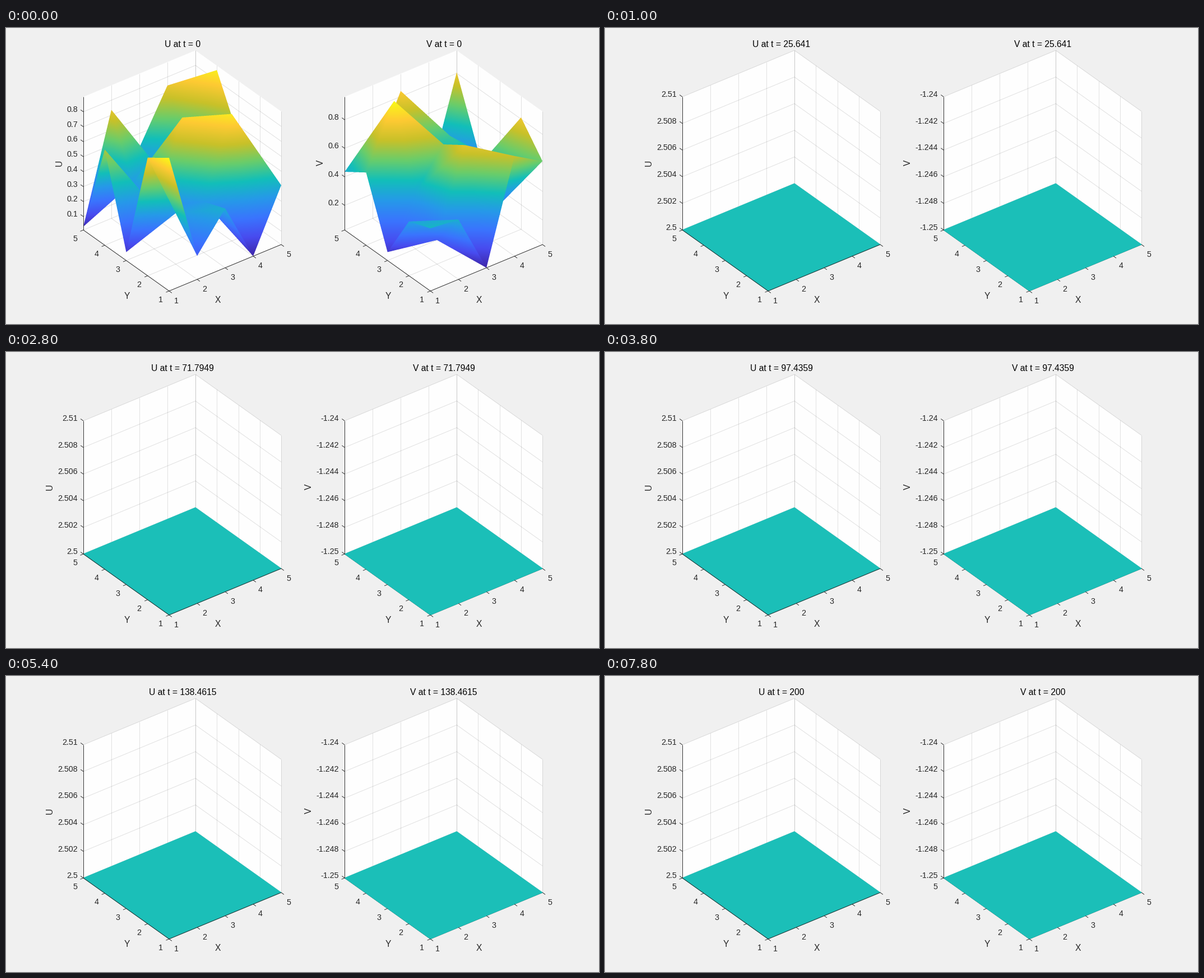
Recreate the animation shown at these times as a matplotlib script. Size 1058x529 px, loop 8000 ms.

```python
import numpy as np
import matplotlib.pyplot as plt
from matplotlib.animation import FuncAnimation
from matplotlib.colors import LinearSegmentedColormap

W, H, DPI = 1058, 529, 64
PT = 72 / DPI            # points per pixel
FRAMES, T_END = 40, 200
INK = "#262626"
TEAL = "#1bbfb8"
THIN = .9 * PT

plt.rcParams["font.family"] = "Liberation Sans"

PARULA = LinearSegmentedColormap.from_list("parula", [
    "#3e26a8", "#484bef", "#3a74fe", "#2699e9", "#12bfb9",
    "#69cd6b", "#c8c129", "#feca33", "#f9fb15"])

# Screen steps of the orthographic view, one grid unit each
ORIGIN = np.array([291.0, 470.0])
DX = np.array([50.0, -20.75])
DY = np.array([-38.25, -27.25])
HEIGHT = 238.0
SHIFT = np.array([466.2, 0.0])

# Peaks and valleys (column, row): height in pixels
U_PEAKS = {(0, 0): 238, (1, 0): 42, (3, 0): 0, (0, 1): 211, (3, 1): 227,
           (0, 2): 15, (2, 2): 214, (4, 2): 139, (0, 3): 171, (4, 3): 230,
           (0, 4): 6, (1, 4): 194, (3, 4): 196}
V_PEAKS = {(2, 0): 0, (3, 0): 179, (4, 0): 149, (0, 1): 97, (1, 1): 43,
           (2, 1): 192, (3, 1): 53, (4, 1): 200, (0, 2): 15, (2, 2): 166,
           (0, 3): 130, (1, 3): 237, (3, 3): 133, (2, 4): 207, (3, 4): 26,
           (4, 4): 199}


def u_height(i, j):
    return U_PEAKS.get((i, j), 76 + 15 * abs(j - 2))


def v_height(i, j):
    return V_PEAKS.get((i, j), 112 - 5 * i - 2 * j)


fig = plt.figure(figsize=(W / DPI, H / DPI), dpi=DPI, facecolor="#f0f0f0")
ax = fig.add_axes([0, 0, 1, 1])
ax.set_xlim(0, W)
ax.set_ylim(H, 0)
ax.axis("off")


def unit(v):
    return v / np.hypot(*v)


def project(off, i, j, h=0.0):
    return ORIGIN + off + i * DX + j * DY - np.array([0, h])


def line(a, b, alpha=1.0, z=2):
    return ax.plot([a[0], b[0]], [a[1], b[1]], color=INK, alpha=alpha,
                   lw=THIN, zorder=z, solid_capstyle="butt")[0]


def poly(points, color, z, lw=0):
    return ax.fill(*np.array(points).T, facecolor=color, edgecolor=color,
                   lw=lw, zorder=z)[0]


def text(x, y, s, size=14.2, ha="center", color=INK):
    return ax.text(x, y + .36 * size, s, fontsize=size * PT, ha=ha,
                   va="baseline", color=color, zorder=8)


def render(height, off, ss=3):
    """Colour-mapped surface, painted from the far corner to the near one."""
    x0, y0, w, h = 130 + int(off[0]), 35, 370, 440
    gx, gy = np.meshgrid(x0 + (np.arange(w * ss) + .5) / ss,
                         y0 + (np.arange(h * ss) + .5) / ss)
    level = np.full(gx.shape, -1.0)
    cells = sorted(((i, j) for i in range(4) for j in range(4)),
                   key=lambda c: -sum(c))
    for i, j in cells:
        for first in ((i + 1, j + 1), (i, j)):
            corners = [first, (i + 1, j), (i, j + 1)]
            hs = [height(*c) for c in corners]
            p, q, r = [project(off, *c, v) for c, v in zip(corners, hs)]
            (ux, uy), (vx, vy) = p - r, q - r
            det = ux * vy - uy * vx
            if abs(det) < 1e-6:
                continue
            a = ((gx - r[0]) * vy - (gy - r[1]) * vx) / det
            b = ((gy - r[1]) * ux - (gx - r[0]) * uy) / det
            c = 1 - a - b
            inside = (a >= 0) & (b >= 0) & (c >= 0)
            level[inside] = (a * hs[0] + b * hs[1] + c * hs[2])[inside] / HEIGHT
    rgba = PARULA(np.clip(level, 0, 1))
    rgba[..., 3] = level >= 0
    rgba[..., :3] *= rgba[..., 3:]
    small = rgba.reshape(h, ss, w, ss, 4).mean(axis=(1, 3))
    small[..., :3] /= np.maximum(small[..., 3:], 1e-9)
    return ax.imshow(np.clip(small, 0, 1), interpolation="nearest",
                     extent=(x0, x0 + w, y0 + h, y0),
                     aspect="auto", zorder=4)


def z_axis(off, name, ticks, labels, name_x):
    """Grid, ticks and labels for one vertical scale; ticks are pixel heights."""
    parts = []
    left, back, right = (project(off, *c) for c in ((0, 4), (4, 4), (4, 0)))
    for h, s in zip(ticks, labels):
        up = np.array([0, h])
        parts.append(line(left - up, back - up, alpha=.15))
        parts.append(line(back - up, right - up, alpha=.15))
        parts.append(line(left - up, left - up + unit(DY) * 6, z=6))
        parts.append(text(left[0] - 10, left[1] - h - 5, s, ha="right"))
    parts.append(ax.text(name_x, 241, name, fontsize=15.6 * PT, rotation=90,
                         ha="center", va="center", color=INK, zorder=8))
    return parts


def frame_box(off, axis_z):
    top = np.array([0, HEIGHT])
    near, right, left, back = (project(off, *c) for c in
                               ((0, 0), (4, 0), (0, 4), (4, 4)))
    poly([near, right, right - top, back - top, left - top, left],
         "#fefefe", 1)
    for k in range(5):
        for a, b in (((k, 0), (k, 4)), ((0, k), (4, k))):
            a, b = project(off, *a), project(off, *b)
            line(a, b, alpha=.15)
            line(b, b - top, alpha=.15)
        bx, by = project(off, k, 0), project(off, 0, k)
        line(bx, bx - unit(DY) * 6, z=6)
        line(by, by - unit(DX) * 6, z=6)
        text(bx[0] + 13, bx[1] + 16.5, k + 1)
        text(by[0] - 15, by[1] + 15, k + 1)
    line(left, left - top, z=6)
    line(near, left, z=axis_z)
    line(near, right, z=axis_z)
    text(377.5 + off[0], 485.5, "X", 15.6)
    text(216 + off[0], 478.5, "Y", 15.6)
    return poly([near, right, back, left], TEAL, 4, THIN)


def panel(off, name, height, ticks, labels, flat_from, xs, axis_z):
    flat_labels = [f"{flat_from + k * .002:.4g}" for k in range(6)]
    flat = [frame_box(off, axis_z)]
    flat += z_axis(off, name, np.linspace(0, HEIGHT, 6), flat_labels, xs[1])
    start = [render(height, off)]
    start += z_axis(off, name, ticks, labels, xs[0])
    title = text(315 + off[0], 28.8, "", 15.6, color="black")
    return name, title, start, flat


panels = [
    panel(np.zeros(2), "U", u_height, 24 + 26.75 * np.arange(8),
          [f"{k / 10:.1f}" for k in range(1, 9)], 2.5, (95, 78), 6),
    panel(SHIFT, "V", v_height, 44 + 51 * np.arange(4),
          [f"{k / 10:.1f}" for k in range(2, 9, 2)], -1.25, (561, 540), 3),
]


def update(n):
    t = f"{T_END * n / (FRAMES - 1):.4f}".rstrip("0").rstrip(".")
    changed = []
    for name, title, start, flat in panels:
        title.set_text(f"{name} at t = {t}")
        for artist in start:
            artist.set_visible(n == 0)
        for artist in flat:
            artist.set_visible(n > 0)
        changed += [title, *start, *flat]
    return changed


anim = FuncAnimation(fig, update, frames=FRAMES, interval=200,
                     init_func=lambda: update(0), repeat=True,
                     repeat_delay=0, blit=False)
plt.show()
```
